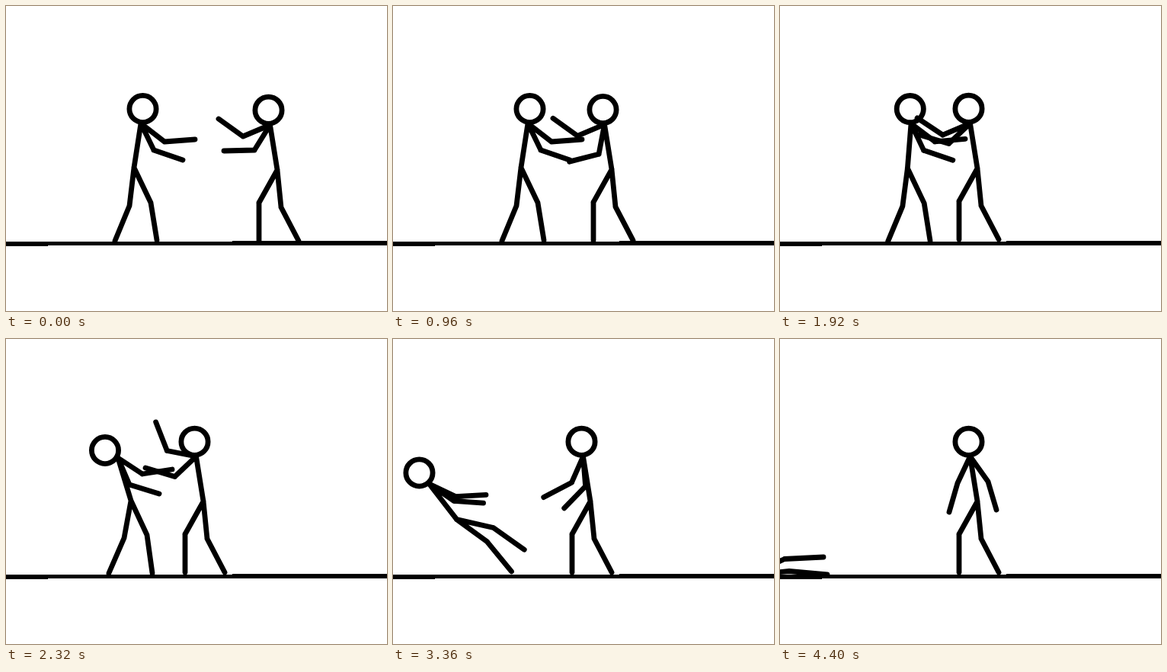
Write an HTML page with a canvas that moves like this. It is 500x400 px and loops after 4.48 s.

```html
<!DOCTYPE html>
<html lang="en">
<head>
<meta charset="utf-8">
<title>Stick figure shove</title>
<style>
  html, body { margin: 0; width: 100%; height: 100%; overflow: hidden; background: #fff; }
  canvas { display: block; }
</style>
</head>
<body>
<canvas id="stage" width="500" height="400"></canvas>
<script>
const ctx = document.getElementById('stage').getContext('2d');
const STEP = 80, STEPS = 56;

// Joints: neck, head, hip, elbow, hand, elbow, hand, knee, foot, knee, foot
const PARENT = [-1, 0, 0, 0, 3, 0, 5, 2, 7, 2, 9];

const standing = [[177,154], [179.5,135], [168,212], [208,178], [248,175], [194,189], [232,202],
                  [162,262], [143,308], [190,258], [198,307]];

const left = [
  [0, standing],
  [23, standing],
  [29, [[147,156], [130,146], [164,212], [179,177], [218,171], [162,191], [201,203],
        [155,261], [135,307], [185,257], [192,307]]],
  [37, [[89,161], [75,147], [121,211], [90,199], [114,231], [109,194], [145,211],
        [137,258], [137,308], [156,245], [176,290]]],
  [47, [[6,219], [-6,204], [46,262], [44,206], [71,179], [44,214], [78,193],
        [95,263], [145,273], [93,246], [143,250]]],
  [55, [[-95,303], [-112,295], [-38,309], [-58,290], [-25,270], [-57,296], [-24,275],
        [12,304.5], [62,309], [6,288.5], [57,286]]]
];

const add = (p, q) => [p[0] + q[0], p[1] + q[1]];

// The right figure keeps its body shape; arms are [upper, fore] vectors
function walker(x, y, armA, armB) {
  const neck = [x, y];
  const at = (dx, dy) => add(neck, [dx, dy]);
  const arm = ([upper, fore]) => [add(neck, upper), add(add(neck, upper), fore)];
  return [neck, at(-2, -19.3), at(9.5, 59), ...arm(armA), ...arm(armB),
          at(-14.5, 102), at(-14.5, 152), at(14.5, 108), at(37.5, 152)];
}

const raised = [[-35.5,15], [-32,-23]];
const guard = [[-28,26.5], [-38.5,-11.5]];
const ready = [[-25,30], [-40,-4]];
const backA = [[-16.5,35], [-11,38]];
const backB = [[23.5,33], [11,37]];

const right = [
  [0, walker(346.5, 156, raised, [[-20.5,33], [-40,1]])],
  [8, walker(298.5, 156, raised, [[4.5,40], [-34,19]])],
  [14, walker(267, 155, raised, [[-13,37], [-40,5]])],
  [17, walker(253.5, 154, [[-20.5,24], [-40,-3]], [[-20.5,33], [-40,-3]])],
  [19, walker(249.5, 154, guard, ready)],
  [20, walker(249.5, 154, guard, ready)],
  [30, walker(249.5, 154, guard, [[-37,-12], [-10,-39]])],
  [37, walker(249.5, 154, guard, [[-14.5,36], [-40,2]])],
  [47, walker(249.5, 154, [[-0.5,36], [-13,41]], [[20.5,34], [-1,40]])],
  [49, walker(249.5, 154, [[-9,37], [-12,39]], backB)],
  [51, walker(249.5, 154, backA, backB)]
];

const mix = (a, b, k) => a + (b - a) * k;

// Turn a bone the short way round while blending its length
function turn(a, b, k) {
  const from = Math.atan2(a[1], a[0]);
  const diff = Math.atan2(b[1], b[0]) - from;
  const angle = from + Math.atan2(Math.sin(diff), Math.cos(diff)) * k;
  const len = mix(Math.hypot(...a), Math.hypot(...b), k);
  return [len * Math.cos(angle), len * Math.sin(angle)];
}

function poseAt(keys, n) {
  const next = keys.findIndex(key => key[0] > n);
  if (next < 0) return keys[keys.length - 1][1];
  const [t0, a] = keys[next - 1], [t1, b] = keys[next];
  const k = (n - t0) / (t1 - t0);
  const pose = [];
  PARENT.forEach((p, i) => {
    if (p < 0) {
      pose.push([mix(a[i][0], b[i][0], k), mix(a[i][1], b[i][1], k)]);
      return;
    }
    const bone = q => [q[i][0] - q[p][0], q[i][1] - q[p][1]];
    pose.push(add(pose[p], turn(bone(a), bone(b), k)));
  });
  return pose;
}

function drawFigure(pose) {
  ctx.beginPath();
  PARENT.forEach((p, i) => {
    if (i < 2) return;
    ctx.moveTo(...pose[p]);
    ctx.lineTo(...pose[i]);
  });
  ctx.stroke();
  ctx.beginPath();
  ctx.arc(...pose[1], 17.6, 0, Math.PI * 2);
  ctx.stroke();
}

function drawGround() {
  ctx.fillRect(0, 309, 55, 6);
  ctx.fillRect(55, 309, 242, 5);
  ctx.fillRect(297, 308, 203, 6);
}

ctx.lineCap = ctx.lineJoin = 'round';
ctx.lineWidth = 6.8;

function render(now) {
  const n = Math.floor(now / STEP) % STEPS;
  ctx.fillStyle = '#fff';
  ctx.fillRect(0, 0, 500, 400);
  ctx.fillStyle = ctx.strokeStyle = '#000';
  drawGround();
  drawFigure(poseAt(left, n));
  drawFigure(poseAt(right, n));
}

const start = performance.now();
function tick() {
  render(performance.now() - start);
  requestAnimationFrame(tick);
}
tick();
</script>
</body>
</html>
```
